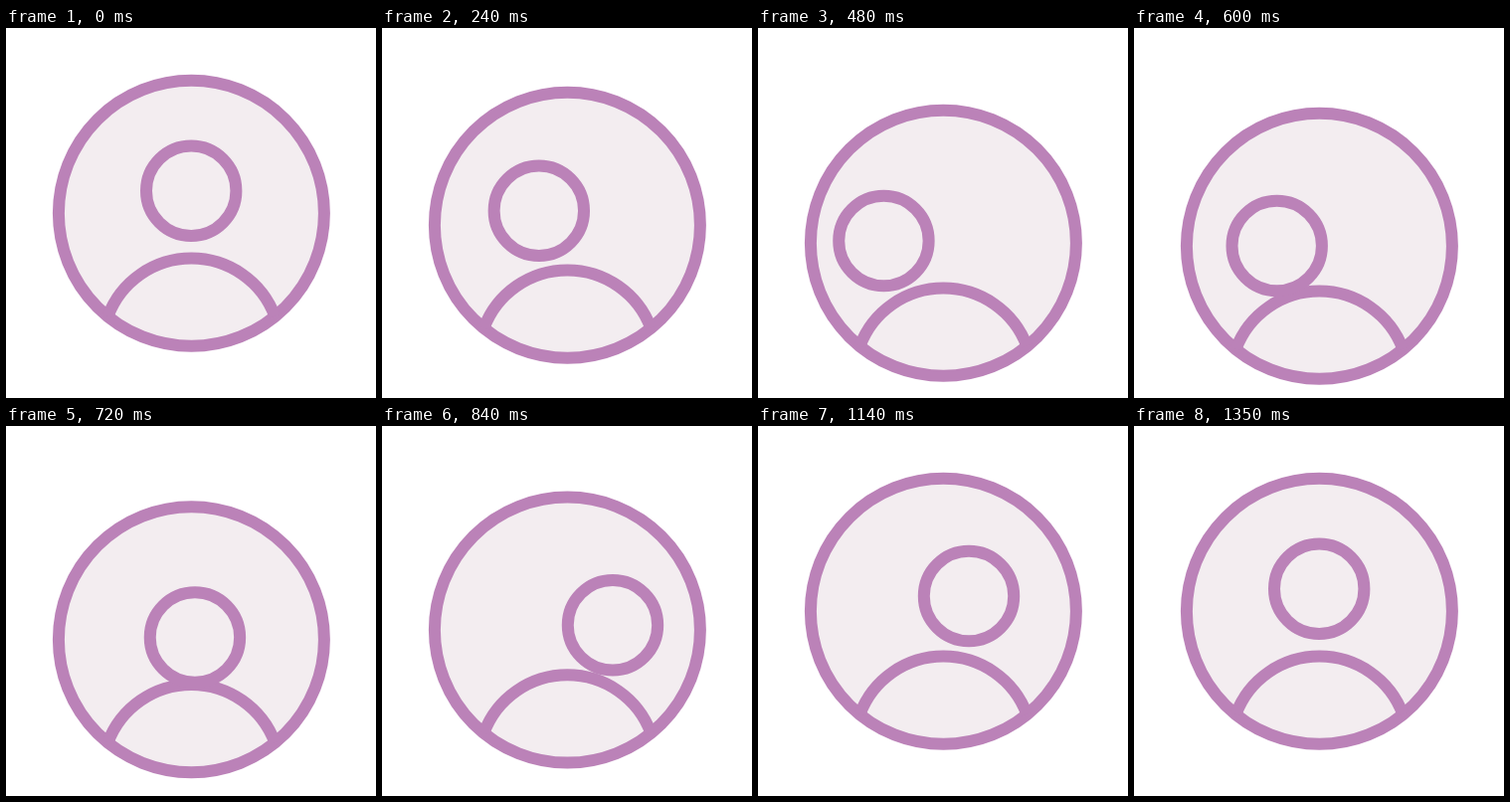
An HTML page for the animation above (1.8 s loop, 372x372 px).

```html
<!DOCTYPE html>
<html lang="en">
<head>
<meta charset="utf-8">
<title>Rolling avatar</title>
<style>
  html, body { margin: 0; width: 100%; height: 100%; overflow: hidden; background: #fff; }
  svg { display: block; width: 100vw; height: 100vh; }
</style>
</head>
<body>
<svg viewBox="0 0 372 372" fill="none" stroke="#bb82b8" stroke-width="12">
  <g id="body">
    <circle cx="186.4" cy="186.3" r="133.5" fill="#f3edf0"/>
    <path d="M102.4 290A89.6 89.6 0 0 1 270.4 290"/>
  </g>
  <circle id="head" cx="186.2" cy="163.7" r="45.2"/>
</svg>
<script>
  const LOOP = 1800, STEP = 30;

  // Keys are [step, offset, slope]; a missing slope means a full stop.
  const bodyY = [[0, 0], [19.7, 33], [38, 0]];
  const headX = [[0, 0], [16.6, -60], [30.4, 55], [45, 0]];
  const headY = [[0, 0], [12, 36, 3.7], [19.2, 55.5], [32, 23, -3.2], [45, 0]];

  // Cubic Hermite interpolation between neighbouring keys
  function at(keys, t) {
    const i = keys.findIndex(key => key[0] > t);
    if (i < 0) return keys[keys.length - 1][1];
    const [t0, v0, m0 = 0] = keys[i - 1];
    const [t1, v1, m1 = 0] = keys[i];
    const span = t1 - t0, s = (t - t0) / span, r = 1 - s;
    return v0 + (v1 - v0) * s * s * (3 - 2 * s) + span * s * r * (m0 * r - m1 * s);
  }

  const body = document.getElementById('body');
  const head = document.getElementById('head');
  const move = (el, x, y) => el.setAttribute('transform', `translate(${x} ${y})`);

  function draw() {
    const t = Math.floor(performance.now() % LOOP / STEP);
    move(body, 0, at(bodyY, t));
    move(head, at(headX, t), at(headY, t));
    requestAnimationFrame(draw);
  }
  draw();
</script>
</body>
</html>
```
